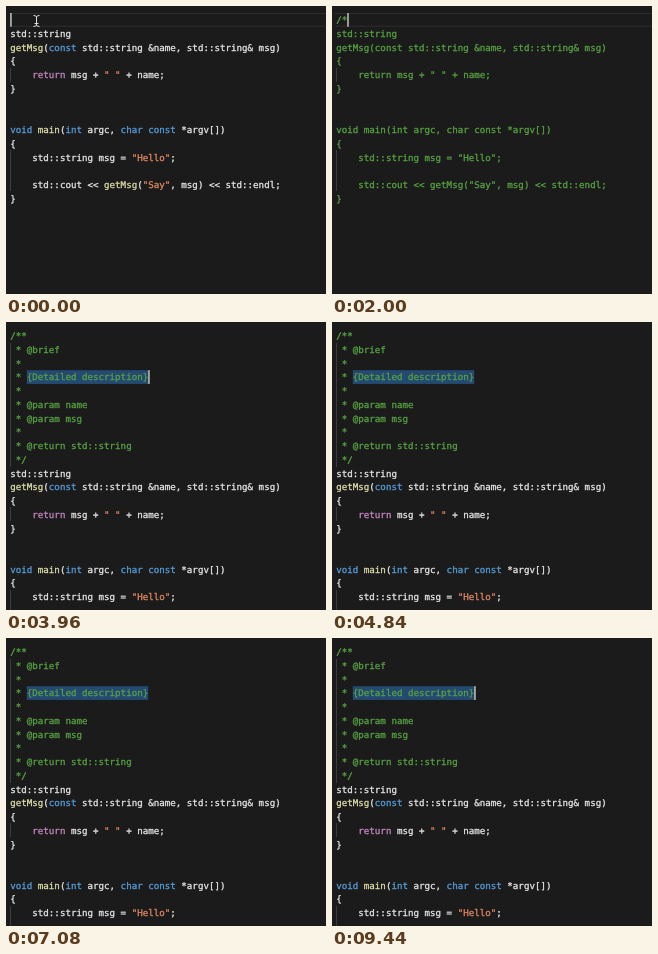
These frames come from a looping animation (320x288 px, 9480 ms). An HTML page with a canvas:

```html
<!DOCTYPE html>
<html lang="en">
<head>
<meta charset="utf-8">
<title>Doc comment snippet</title>
<style>
html, body { margin: 0; width: 100%; height: 100%; overflow: hidden; background: #1b1b1b; }
canvas { display: block; width: 320px; height: 288px; }
</style>
</head>
<body>
<canvas id="stage"></canvas>
<script>
const W = 320, H = 288, LOOP = 9480, BLINK = 1090;
const LEFT = 4.2, TOP = 7, ROW = 13.73, SIZE = 9.17, COL = SIZE * 0.602;
const color = {
  bg: '#1b1b1b', text: '#e6e6e6', keyword: '#569cd6', control: '#c586c0',
  call: '#dcdcaa', string: '#de8762', comment: '#57a042',
  guide: '#3c3c3c', line: '#2d2d2d', select: '#244a72', caret: '#c4c4c2'
};

const code = `std::string
getMsg(const std::string &name, std::string& msg)
{
    return msg + " " + name;
}


void main(int argc, char const *argv[])
{
    std::string msg = "Hello";

    std::cout << getMsg("Say", msg) << std::endl;
}`.split('\n');

const doc = `/**
 * @brief 
 *
 * {Detailed description}
 *
 * @param name
 * @param msg
 *
 * @return std::string
 */`.split('\n');

// Editor states: start time, lines above the code, caret row and column
const steps = [
  { at: 0, head: [''], row: 0, col: 0, pointer: true },
  { at: 960, head: ['/'], row: 0, col: 1 },
  { at: 1560, head: ['/*'], row: 0, col: 2, open: true },
  { at: 2160, head: ['/**'], row: 0, col: 3, open: true },
  { at: 3800, head: ['/**', ' * '], row: 1, col: 3, open: true },
  { at: 3920, head: doc, row: 3, col: 25, from: 3 }
];

const canvas = document.getElementById('stage');
const ctx = canvas.getContext('2d');
const dpr = window.devicePixelRatio || 1;
canvas.width = W * dpr;
canvas.height = H * dpr;

const xOf = col => LEFT + col * COL;
const yOf = row => TOP + row * ROW;

function rect(fill, x, y, w, h) {
  ctx.fillStyle = fill;
  ctx.fillRect(x, y, w, h);
}

// A thin outline gives the slightly heavy look of smoothed screen text
function write(text, row, col, fill) {
  const y = Math.round(yOf(row) + 10.3);
  ctx.fillStyle = ctx.strokeStyle = fill;
  ctx.lineWidth = 0.3;
  [...text].forEach((ch, i) => {
    if (ch === ' ') return;
    ctx.fillText(ch, xOf(col + i), y);
    ctx.strokeText(ch, xOf(col + i), y);
  });
}

function tokenColor(token) {
  if (token[0] === '"') return color.string;
  if (token === 'return') return color.control;
  if (/^(const|void|int|char)$/.test(token)) return color.keyword;
  if (/^(getMsg|main)$/.test(token)) return color.call;
  return color.text;
}

function writeCode(line, row) {
  for (const m of line.matchAll(/"[^"]*"|\w+|\s+|./g)) {
    write(m[0], row, m.index, tokenColor(m[0]));
  }
}

function drawGuide(row, count) {
  rect(color.guide, 4, Math.round(yOf(row)), 1, Math.round(count * ROW));
}

function drawPointer(x, y) {
  ctx.strokeStyle = '#dddddd';
  ctx.lineWidth = 1;
  ctx.beginPath();
  for (const s of [-1, 1]) {
    ctx.moveTo(x - 3, y + s * 5.5);
    ctx.quadraticCurveTo(x, y + s * 5.5, x, y + s * 4);
    ctx.quadraticCurveTo(x, y + s * 5.5, x + 3, y + s * 5.5);
  }
  ctx.moveTo(x, y - 4.5);
  ctx.lineTo(x, y + 4.5);
  ctx.moveTo(x - 2, y + 2.5);
  ctx.lineTo(x + 2, y + 2.5);
  ctx.stroke();
}

function draw(t) {
  const step = steps.filter(s => s.at <= t).pop();
  const { head, row, col, from } = step;
  const first = head.length;

  ctx.setTransform(dpr, 0, 0, dpr, 0, 0);
  ctx.font = `${SIZE}px "DejaVu Sans Mono", monospace`;
  ctx.textBaseline = 'alphabetic';
  ctx.textRendering = 'geometricPrecision';
  ctx.lineJoin = 'round';
  rect(color.bg, 0, 0, W, H);

  if (from === undefined) {
    rect(color.line, 3, yOf(row), W, 1);
    rect(color.line, 3, yOf(row + 1) - 1, W, 1);
  } else {
    rect(color.select, xOf(from), yOf(row), (col - from) * COL, ROW);
  }

  drawGuide(1, first - 1);
  drawGuide(first + 3, 1);
  drawGuide(first + 9, 3);

  const headColor = step.open || head === doc ? color.comment : color.text;
  head.forEach((line, i) => write(line, i, 0, headColor));
  code.forEach((line, i) => {
    if (step.open) write(line, first + i, 0, color.comment);
    else writeCode(line, first + i);
  });

  if ((t - step.at) % BLINK < BLINK / 2) {
    rect(color.caret, xOf(col), yOf(row), 1.5, ROW);
  }
  if (step.pointer) drawPointer(30.5, 15);
}

function tick() {
  draw(performance.now() % LOOP);
  requestAnimationFrame(tick);
}
tick();
</script>
</body>
</html>
```
